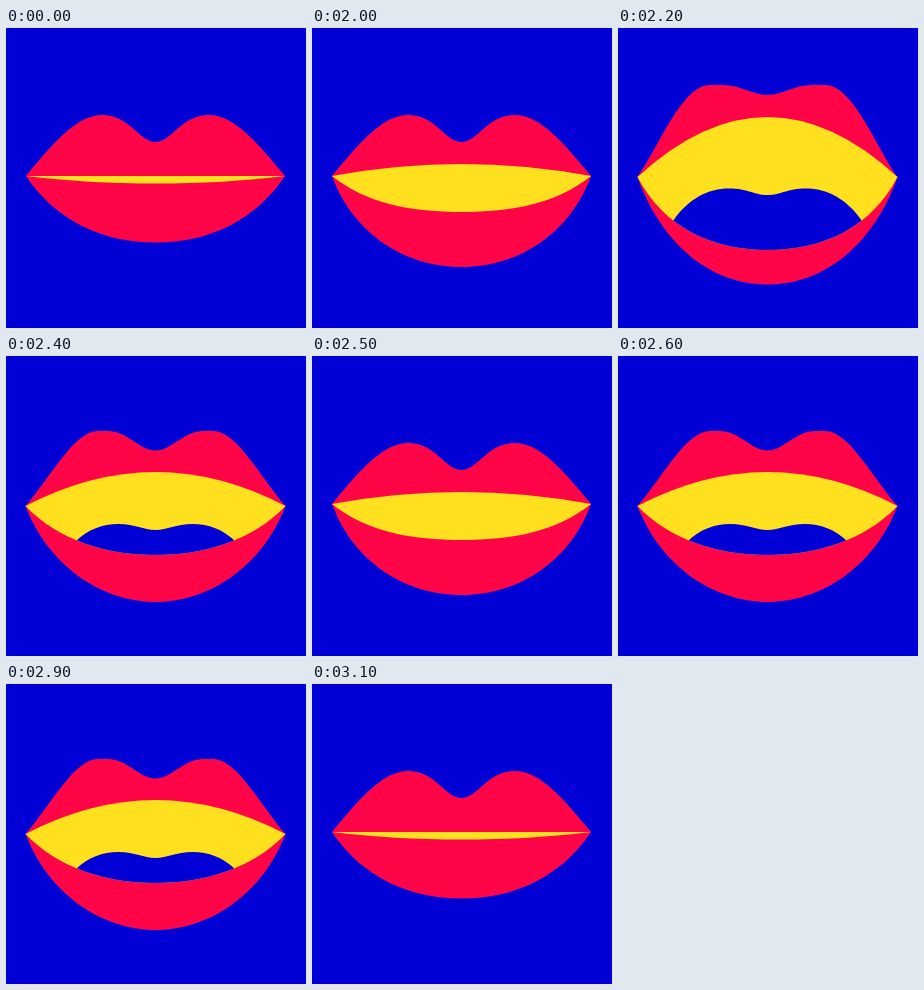
An HTML page with a canvas that plays this animation: 300 by 300 pixels, repeating every 3300 ms.

```html
<!DOCTYPE html>
<html lang="en">
<head>
<meta charset="utf-8">
<title>Talking lips</title>
<style>
  html, body { margin: 0; width: 100%; height: 100%; overflow: hidden; background: #0000d6; }
  canvas { display: block; width: 300px; height: 300px; }
</style>
</head>
<body>
<canvas id="stage"></canvas>
<script>
const BLUE = '#0000d6', RED = '#ff0547', YELLOW = '#ffe01e';
const LOOP = 3300, MID = 149.5;

// Left halves of the curves, running from the corner to the middle line.
// top: corner, two controls, peak start, peak end, two controls, dip
// base, lower: corner, two controls, middle; arch: height of the teeth's control point
// hole: same layout as the second part of a lip, from its corner to its dip
const closed = {
  top: [20,148, 45,118, 70,87, 96,87, 96,87, 124,87, 133,114, MID,114],
  base: [20,148, 50,193, 97,214.5, MID,214.5],
  arch: 148,
  lower: [20,148, 60,153, 105,155.5, MID,155.5]
};
const ajar = {
  top: closed.top,
  base: [20,148, 40,203, 90,239, MID,239],
  arch: 124,
  lower: [20,148, 55,176, 100,184, MID,184]
};
const open = {
  top: [19.5,150, 45,121, 68,75, 92,75, 101,75, 122,75, 133,94.5, MID,94.5],
  base: [19.5,150, 42,209, 95,246, MID,246],
  arch: 82,
  lower: [19.5,150, 52,184, 100,199, MID,199],
  hole: [69,186, 82,173, 97,168, 112,168, 112,168, 130,168, 137,174, MID,174]
};
const wide = {
  top: [19.5,149, 42,117, 64,57, 92,57, 105,57, 123,57, 134,67, MID,67],
  base: [19.5,149, 42,213, 90,256.5, MID,256.5],
  arch: 29,
  lower: [19.5,149, 45,198, 92,222, MID,222],
  hole: [55,193, 70,171, 90,160.5, 111,160.5, 111,160.5, 130,160.5, 136,167, MID,167]
};

const mix = (a, b, t) => Array.isArray(a) ? a.map((v, i) => mix(v, b[i], t)) : a + (b - a) * t;
const blend = (p, q, t) =>
  Object.fromEntries(Object.keys(p).map(k => [k, mix(p[k], q[k], t)]));

const steps = [
  [0, closed], [2000, ajar], [2100, open], [2200, wide],
  [2300, blend(wide, open, 0.5)], [2400, open], [2500, ajar],
  [2600, open], [2700, ajar], [2800, closed], [2900, open],
  [3000, ajar], [3100, closed]
];

const canvas = document.getElementById('stage');
const ctx = canvas.getContext('2d');
const ratio = window.devicePixelRatio || 1;
canvas.width = canvas.height = 300 * ratio;
ctx.scale(ratio, ratio);

// The same points seen from the right corner, back to front.
function mirror(pts) {
  const out = [];
  for (let i = pts.length - 2; i >= 0; i -= 2) out.push(2 * MID - pts[i], pts[i + 1]);
  return out;
}

// Appends a half curve: one cubic, or cubic, line, cubic.
function trace(path, pts) {
  path.lineTo(pts[0], pts[1]);
  path.bezierCurveTo(...pts.slice(2, 8));
  if (pts.length > 8) {
    path.lineTo(pts[8], pts[9]);
    path.bezierCurveTo(...pts.slice(10));
  }
}

function across(path, half) {
  trace(path, half);
  trace(path, mirror(half));
}

function backwards(path, half) {
  const full = new Path2D();
  across(full, half);
  path.addPath(full);
}

function fill(path, color) {
  ctx.fillStyle = color;
  ctx.fill(path);
}

function draw(pose) {
  ctx.fillStyle = BLUE;
  ctx.fillRect(0, 0, 300, 300);

  const left = pose.top[0], corner = pose.top[1], right = 2 * MID - left;
  const lips = new Path2D();
  backwards(lips, pose.top);
  backwards(lips, pose.base);
  for (const half of [pose.top, pose.base]) {
    const part = new Path2D();
    across(part, half);
    part.closePath();
    fill(part, RED);
  }
  fill(new Path2D(`M${left},${corner - 0.5}H${right}v1H${left}z`), RED);

  const teeth = new Path2D();
  across(teeth, pose.lower);
  teeth.quadraticCurveTo(MID, pose.arch, left, corner);
  fill(teeth, YELLOW);

  if (!pose.hole) return;
  ctx.save();
  ctx.clip(teeth);
  const hole = new Path2D();
  across(hole, pose.hole);
  hole.lineTo(2 * MID - pose.hole[0], 240);
  hole.lineTo(pose.hole[0], 240);
  fill(hole, BLUE);
  ctx.restore();
}

const start = performance.now();
let shown = null;

function tick() {
  const time = (performance.now() - start) % LOOP;
  const pose = steps.filter(([at]) => at <= time).pop()[1];
  if (pose !== shown) draw(shown = pose);
  requestAnimationFrame(tick);
}
tick();
</script>
</body>
</html>
```
